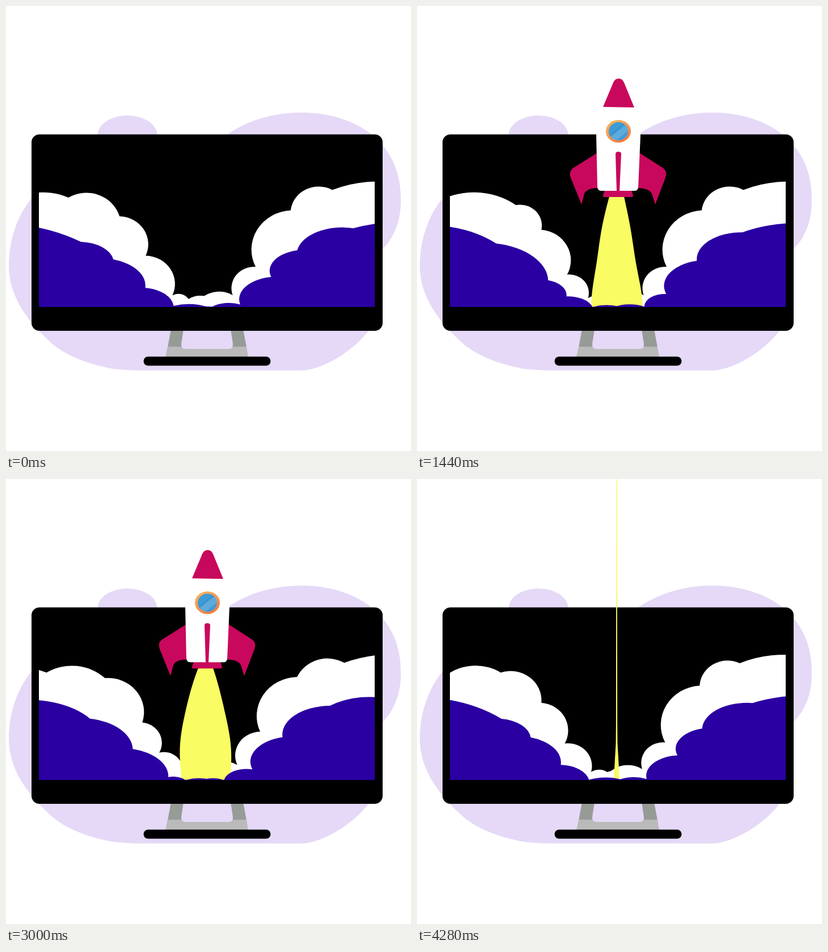
An HTML page that plays this animation: 714 px wide and 785 px high, repeating every 4320 ms.

```html
<!DOCTYPE html>
<html lang="en">
<head>
<meta charset="utf-8">
<title>Rocket launch</title>
<style>
  html, body { margin: 0; width: 100%; height: 100%; overflow: hidden; background: #fff; }
  svg { display: block; width: 714px; height: 785px; }
  .haze { fill: #e5d9f7; }
  .red { fill: #c8085c; }
  .white { fill: #fff; }
  .blue { fill: #2a00a2; }
</style>
</head>
<body>
<svg viewBox="0 0 714 785">
  <defs>
    <clipPath id="screen"><path d="M58 250H650V531H58Z"/></clipPath>
    <clipPath id="above"><path d="M0 0H714V531H0Z"/></clipPath>
    <clipPath id="glass"><ellipse cx="355" cy="221" rx="17" ry="16"/></clipPath>
    <linearGradient id="rim" x1="0" y1="0" x2=".6" y2="1">
      <stop offset="0" stop-color="#fabd62"/><stop offset="1" stop-color="#f47a40"/>
    </linearGradient>
  </defs>

  <g class="haze">
    <ellipse cx="214" cy="228" rx="52.500" ry="35"/>
    <path d="M388 228C425 202 470 188 522 188C570 188 616 203 645 227C680 255 696 295 696 340C697 375 686 409 660 433L640 572C612 608 570 634 532 642Q526 643 518 643H240Q215 643 188 640C140 631 105 615 84 598C35 555 5 510 5 458C5 410 22 365 48 336L80 260H388Z"/>
  </g>
  <path fill="#969b96" d="M291 570H418L424 602H285Z"/>
  <path fill="#bababa" d="M285 601H424L427 619H281Z"/>
  <path class="haze" d="M313 570H396L400 596Q401 605 392 605H317Q308 605 309 596Z"/>
  <rect x="242.500" y="618.500" width="224" height="16" rx="8"/>
  <rect x="45" y="226.500" width="619" height="346.500" rx="14"/>

  <g clip-path="url(#screen)">
    <path id="whiteL" class="white"/>
    <path id="whiteR" class="white"/>
  </g>
  <g clip-path="url(#above)">
    <path id="flame" fill="#f9fc62"/>
    <g id="rocket">
      <path class="red" d="M318 259L275 286Q267 292 271 303L290 350L295 331Q299 321 320 321ZM392 259L434 286Q442 292 438 303L420 350L414 331Q409 321 388 321Z"/>
      <path class="red" d="M331 325H378L381 334Q381 337 378 337H330Q327 337 328 334Z"/>
      <path class="white" d="M328 177Q316 200 316 228L318 320Q319 326 325 326H384Q389 326 390 320L394 228Q394 200 383 178Z"/>
      <path class="red" d="M328 178L346 135Q349 128 355.500 128Q362 128 365 135L383 179Z"/>
      <path class="red" d="M350 261Q350 257 355 257Q360 257 360 261L357 327H352Z"/>
      <ellipse cx="355" cy="221" rx="22" ry="20" fill="url(#rim)"/>
      <g clip-path="url(#glass)">
        <path fill="#3f9bd5" d="M335 200H375V240H335Z"/>
        <path stroke="#5eaadb" stroke-width="11" d="M340 239L375 211"/>
        <path stroke="#2f80b8" d="M340 229L366 207"/>
      </g>
    </g>
  </g>
  <g clip-path="url(#screen)">
    <path id="blueL" class="blue"/>
    <path id="blueR" class="blue"/>
  </g>
</svg>

<script>
const LOOP = 4320, STEP = 40, FLOOR = 531;
const YOUNGEST = -1300, OLDEST = 3200;
const el = id => document.getElementById(id);
const clamp = (v, lo = 0, hi = 1) => Math.min(hi, Math.max(lo, v));
const arch = u => (1 - Math.cos(Math.PI * u)) / 2;

// Notches between bumps are born at the foot of a cloud, climb an arch and drift outwards.
// dir: drift direction, round and squash: bump shape, births: ages of the notches at t = 0.
const clouds = [
  { id: 'whiteL', dir: -1, x: 307, y: 517, rise: 179, from: -50, top: 2000, speed: .068, rush: 100,
    round: .6, squash: .95, period: 2240, births: [200, 880, 1420, 2020] },
  { id: 'whiteR', dir: 1, x: 397, y: 515, rise: 191, from: -200, top: 2160, speed: .066, rush: 57,
    round: .6, squash: .95, period: 1440, births: [40, 650] },
  { id: 'blueL', dir: -1, x: 310, y: 531, rise: 141, from: 0, top: 2300, speed: .085, rush: 174,
    round: .8, squash: .6, period: 2185, births: [170, 750, 1290, 1650] },
  { id: 'blueR', dir: 1, x: 397, y: 531, rise: 141, from: -50, top: 1950, speed: .088, rush: 174,
    round: .68, squash: .6, period: 2185, births: [180, 790, 1225, 1795] }
];

function notch(c, age) {
  const climb = Math.max(0, (age - c.from) / (c.top - c.from));
  const sink = Math.max(0, -age - 850) * .15;
  const drift = c.speed * age + c.rush * Math.max(0, age / 2240) ** 5;
  return [c.x + c.dir * drift, c.y - c.rise * arch(climb) + sink];
}

// Elliptic bump, flatter where the outline runs level.
function bump([x0, y0], [x1, y1], c) {
  const dx = x1 - x0, dy = (y1 - y0) / c.squash;
  const len = Math.hypot(dx, dy) || 1;
  const level = 1 - clamp(2.5 * dy / len);
  const r = len * c.round * (1 + .5 * level);
  return `A${r} ${r * c.squash} 0 0 ${c.dir < 0 ? 1 : 0} ${x1} ${y1}`;
}

function cloudPath(c, t) {
  const ages = [];
  for (const birth of c.births) {
    const youngest = YOUNGEST + (((birth + t - YOUNGEST) % c.period) + c.period) % c.period;
    for (let age = youngest; age < OLDEST; age += c.period) ages.push(age);
  }
  const pts = ages.sort((a, b) => b - a).map(age => notch(c, age));
  const bumps = pts.slice(1).map((p, i) => bump(pts[i], p, c));
  return `M${pts[0][0]} 600L${pts[0]}${bumps.join('')}V600Z`;
}

const hover = t => 125.2 + 3.2 * Math.cos(2 * Math.PI * (t - 660) / 720);

// Height of the nose tip: rise, hover, crouch, launch.
function noseY(t) {
  const low = 163, crouch = 3360, launch = 3600;
  if (t < 650) return 128 + 412 * (1 - t / 650) ** 2;
  if (t < crouch) return hover(t);
  if (t < launch) {
    const y = hover(crouch);
    return y + (low - y) * arch((t - crouch) / (launch - crouch));
  }
  return low - 144 * ((t - launch) / 320) ** 2;
}

function flamePath(top, t) {
  if (top > FLOOR) return '';
  const fade = clamp((t - 3880) / 400);
  const width = 1 - .975 * fade;
  const sway = 4 * Math.cos(2 * Math.PI * t / 960 - 3.93);
  const left = [], right = [];
  for (let i = 0; i <= 24; i++) {
    const u = i / 24, y = top + (FLOOR + 2 - top) * u;
    const wave = sway * Math.sin(Math.PI * u) + 1.5 * Math.sin(9 * u - t / 150) * u;
    const foot = fade * 4 * clamp((y - 460) / 71);
    const half = (grow, power) => (13 + grow * (1 - (1 - u) ** power) - wave) * width + foot;
    left.push([352 - half(31, 2), y]);
    right.unshift([352 + half(32, 1.6), y]);
  }
  return 'M' + left.concat(right).join('L') + 'Z';
}

function draw(t) {
  for (const c of clouds) el(c.id).setAttribute('d', cloudPath(c, t));
  const y = noseY(t);
  el('rocket').setAttribute('transform', `translate(0 ${y - 128})`);
  el('flame').setAttribute('d', flamePath(y + 208, t));
}

const start = performance.now();
function tick() {
  const t = (performance.now() - start) % LOOP;
  draw(Math.floor(t / STEP) * STEP);
  requestAnimationFrame(tick);
}
tick();
</script>
</body>
</html>
```
